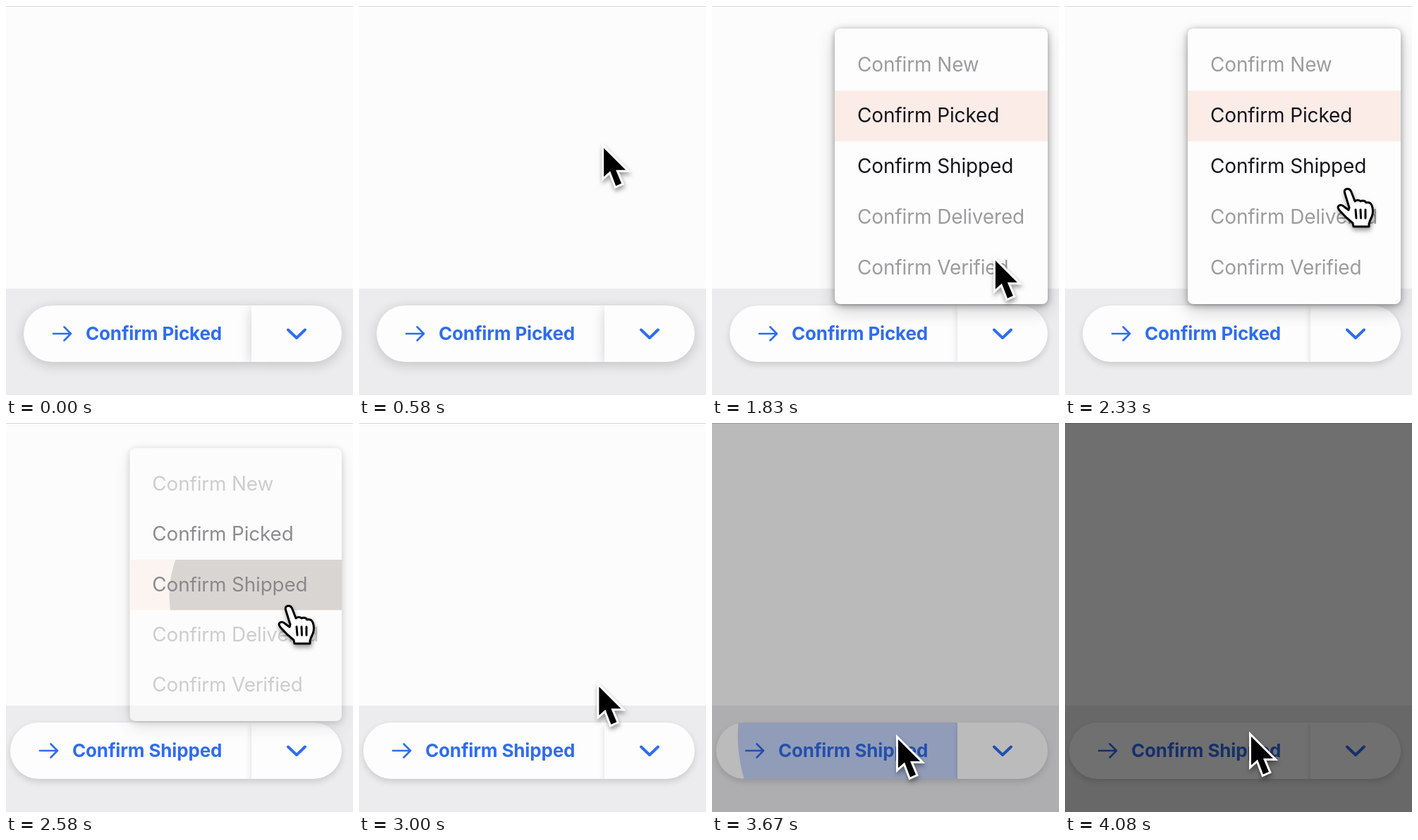
Write an HTML page that moves like this. It is 492 px wide and 552 px high and loops after 4160 ms.

```html
<!DOCTYPE html>
<html lang="en">
<head>
<meta charset="utf-8">
<title>Split button</title>
<style>
  html, body { margin: 0; width: 100%; height: 100%; overflow: hidden; }
  body {
    --ink: #306dec; --fill: #316df8; --paper: #fdfdfd; --calm: 0; --hover: 0;
    position: relative; background: #fcfcfc; font-family: Inter, "Liberation Sans", sans-serif;
  }
  body *, svg { position: absolute; box-sizing: border-box; }
  svg * { position: static; }
  svg { left: 0; top: 0; overflow: visible; fill: none; stroke-linecap: round; stroke-linejoin: round; }

  .line { left: 0; top: 0; width: 492px; height: 1px; background: #d6d6d8; }
  .bar { left: 0; top: 401px; width: 492px; height: 151px; background: #ececee; }

  .main, .split {
    --mix: calc(var(--hover) * 100%);
    top: 425px; height: 80px;
    color: color-mix(in srgb, #fff var(--mix), var(--ink));
    background: color-mix(in srgb, var(--fill) var(--mix), var(--paper));
    box-shadow: 0 4px calc(18px - 8px * var(--calm)) rgb(0 0 0 / calc((.18 - .04 * var(--calm)) * var(--lift, 1)));
  }
  .main { right: calc(100% - 348px); border-radius: 40px 0 0 40px; overflow: hidden; }
  .main span { left: 88px; font-size: 26px; font-weight: 700; line-height: 80px; letter-spacing: -.006em; white-space: nowrap; }
  .main svg { stroke: currentColor; stroke-width: 2.7; }
  .split { --lift: calc(1 - var(--hover)); left: 348px; width: 128px; border-radius: 0 40px 40px 0; }
  .split svg { stroke: currentColor; stroke-width: 4; }

  .ripple { width: 2px; height: 2px; margin: -1px; border-radius: 50%; background: currentColor; }
  .main .ripple { left: 250px; top: 18px; }
  .menu .ripple { left: 209px; top: 51px; background: #000; }

  .menu {
    left: 174px; top: 32px; width: 302px; height: 391px; padding: 16px 0; border-radius: 8px;
    background: var(--paper); transform-origin: 100% 100%;
    box-shadow: 0 2px 10px rgba(0,0,0,.36), 0 10px 26px rgba(0,0,0,.18);
  }
  .menu div {
    position: relative; height: 72px; padding-left: 32px; overflow: hidden; color: #14141c;
    font-size: 28px; line-height: 70px; letter-spacing: -.005em; white-space: nowrap;
  }
  .menu .off { color: #9c9c9e; }
  .menu .on { background: #fbece7; }

  .shade { left: 0; top: 0; width: 492px; height: 552px; background: #000; }
  .pointer { left: 0; top: 0; width: 0; height: 0; }
  .hand, .arrow { filter: drop-shadow(1px 4px 3px rgba(0,0,0,.38)); }
  .hand { stroke: #000; stroke-width: 3; }
  .arrow { fill: #000; stroke: #fff; stroke-width: 6; stroke-linejoin: miter; paint-order: stroke; }
</style>
</head>
<body>
  <div class="line"></div>
  <div class="bar"></div>

  <div class="main">
    <div class="ripple"></div>
    <svg width="80" height="80"><path d="M42 40H67M57.500 30.500L67 40L57.500 49.500"/></svg>
    <span></span>
  </div>
  <div class="split"><svg width="128" height="80"><path d="M52 34.500L64 46L76 34.500"/></svg></div>

  <div class="menu">
    <div class="off">Confirm New</div>
    <div class="picked">Confirm Picked</div>
    <div class="shipped"><i class="ripple"></i>Confirm Shipped</div>
    <div class="off">Confirm Delivered</div>
    <div class="off">Confirm Verified</div>
  </div>

  <div class="shade"></div>

  <div class="pointer">
    <svg class="ring" width="1" height="1">
      <circle r="110.500" stroke="#fff" stroke-width="5" stroke-opacity=".8"/>
      <circle r="110.500" stroke="#000" stroke-width="3"/>
    </svg>
    <svg class="arrow" width="1" height="1"><path d="M7 6V46.500L16 38.500L24 59.500L32 56L24 37H38Z"/></svg>
    <svg class="hand" width="1" height="1">
      <path fill="#fff" d="M14.500 21Q13.500 16 18 15.500Q22 15 24 20L29 33Q33 30 37 33Q42 31 45 35Q51 34 53 39Q56 47 53 55Q50 61 49 65V69H27L26 64Q16 56 8 47Q3.500 42 6 39.500Q10 37 14 41L20 45.500L21 42Z"/>
      <path d="M30 45L31 57M37 45L37.500 57M44 45V57"/>
    </svg>
  </div>

<script>
  const LOOP = 4160, FPS = 12;
  const $ = selector => document.querySelector(selector);
  const press = { open: 1080, pick: 2410, send: 3410 };
  const moves = [
    { at: 330, span: 590, x: 398, y: 443 },
    { at: 1420, span: 890, x: 382, y: 244 },
    { at: 2580, span: 720, x: 257, y: 443 },
    { at: 3670, span: 250, x: 257, y: 439 }
  ];

  // Smooth step from 0 to 1
  function ramp(t, start, span) {
    const p = Math.min(Math.max((t - start) / span, 0), 1);
    return p * p * (3 - 2 * p);
  }

  // The sideways part of each move lags behind the vertical one
  function pointerAt(t) {
    let x = 330, y = 40;
    for (const m of moves) {
      const p = ramp(t, m.at, m.span);
      x += (m.x - x) * p * p;
      y += (m.y - y) * p;
    }
    return { x, y };
  }

  const show = (selector, on) => { $(selector).style.visibility = on ? 'visible' : 'hidden'; };
  const setVar = (selector, name, v) => $(selector).style.setProperty(name, v);

  function ripple(selector, age) {
    const style = $(selector).style;
    const radius = Math.max(0, age * (1 - .0006 * Math.min(age, 800)));
    style.transform = `scale(${radius})`;
    style.opacity = (.15 + .13 * ramp(age, 0, 170)) * (1 - ramp(age, 250, 250));
  }

  function drawButton(t, picked) {
    setVar('body', '--calm', ramp(t, 750, 250));
    setVar('.split', '--hover', ramp(t, 790, 210) - ramp(t, press.open + 90, 250));
    setVar('.main', '--hover', ramp(t, 3000, 250) - ramp(t, press.send + 90, 160));
    $('.main').style.left = (picked ? 25 : 6) + 'px';
    $('.main span').textContent = picked ? 'Confirm Picked' : 'Confirm Shipped';
    ripple('.main .ripple', t - press.send);
  }

  function drawMenu(t, picked) {
    const opened = ramp(t, press.open + 40, 210), closed = ramp(t, press.pick + 80, 175);
    const shrink = 1 - opened + closed ** 6;
    const style = $('.menu').style;
    style.opacity = opened - closed;
    style.transform = `scale(${1 - .25 * shrink},${1 - .44 * shrink})`;
    $('.picked').classList.toggle('on', picked);
    $('.shipped').classList.toggle('on', !picked);
    ripple('.menu .ripple', t - press.pick);
  }

  function drawPointer(t) {
    const { x, y } = pointerAt(t);
    const menuOpen = t >= press.open + 170 && t < press.pick + 250;
    const blocked = t >= press.send + 170;
    const hand = !blocked && (menuOpen ? y < 264 : y > 425);
    $('.pointer').style.transform = `translate(${x}px,${y}px)`;
    show('.hand', hand);
    show('.arrow', !hand && t >= moves[0].at);
    show('.ring', Object.values(press).some(p => t >= p && t < p + 170));
  }

  function draw(t) {
    const picked = t < press.pick + 170;
    drawButton(t, picked);
    drawMenu(t, picked);
    drawPointer(t);
    $('.shade').style.opacity = .555 * ramp(t, 3595, 155);
  }

  // The picture advances at a fixed rate, on times rounded to 10 ms
  function tick() {
    const step = Math.floor((performance.now() % LOOP + 5) * FPS / 1000);
    draw(Math.round(step * 100 / FPS) * 10);
    requestAnimationFrame(tick);
  }
  tick();
</script>
</body>
</html>
```
